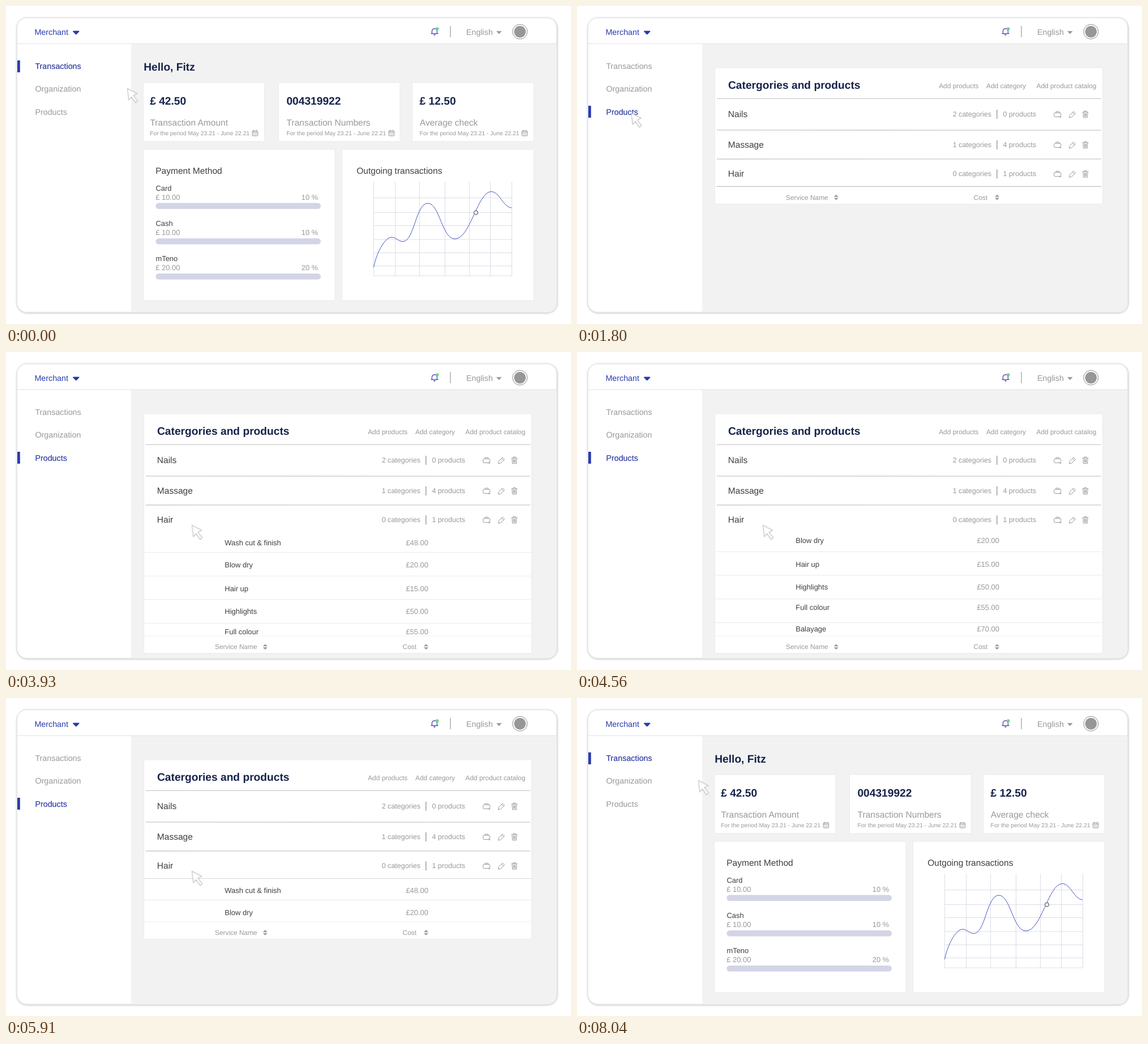
Animation, 998 px wide and 561 px high, one loop 9030 ms. Source, as an HTML page:

```html
<!DOCTYPE html>
<html lang="en">
<head>
<meta charset="utf-8">
<title>Merchant dashboard</title>
<style>
@property --drop { syntax: '<length>'; inherits: true; initial-value: 0px; }

html, body { margin: 0; width: 100%; height: 100%; overflow: hidden; background: #fff; }
svg { display: block; width: 100%; height: 100%; --loop: 9.03s; }
text { font-family: "Liberation Sans", Arial, sans-serif; text-rendering: geometricPrecision; fill: #999; }

.nav { font-size: 14.3px; }
.big { font-size: 19.2px; font-weight: bold; fill: #16234a; }
.mid { font-size: 15.55px; }
.item { font-size: 12.95px; }
.count { font-size: 12.55px; }
.link { font-size: 11.9px; }
.tiny { font-size: 10.35px; }
.dark { fill: #3f3f3f; }
.blue { fill: #2a3bb0; }
.end { text-anchor: end; }
.card { fill: #fff; stroke: #ebebeb; }
.bar { fill: #d3d4e5; }
.rule { stroke: #cacaca; stroke-width: 1.3; }
.thin { stroke: #ebebeb; }
.icon { fill: none; stroke: #999; stroke-width: 1; stroke-linejoin: round; stroke-linecap: round; }

/* One loop = 9030 ms */
#stage { animation: drop var(--loop) infinite; }
#table { height: calc(240px + var(--drop)); }
#window { height: var(--drop); }
#footer { transform: translateY(var(--drop)); }
#cursor { animation: point var(--loop) infinite; }
#dash { animation: dash var(--loop) linear infinite; }
#labels { animation: labels var(--loop) linear infinite; }
#list { animation: list var(--loop) step-end infinite; }
#rows { animation: scroll var(--loop) infinite; }
#onProducts { animation: products var(--loop) step-end infinite; }
#onTransactions { animation: transactions var(--loop) step-end infinite; }

@keyframes point {
  0%, 4.319% { transform: translate(214.5px, 145.5px); animation-timing-function: ease-in-out; }
  11.628%, 19.269% { transform: translate(93.5px, 187.5px); animation-timing-function: ease-in-out; }
  28.571%, 70.764% { transform: translate(328.5px, 305.5px); animation-timing-function: ease-in-out; }
  78.405%, 82.724% { transform: translate(118.5px, 108.5px); animation-timing-function: ease-in-out; }
  89.037%, 100% { transform: translate(214.5px, 145.5px); }
}
@keyframes drop {
  0%, 31.561% { --drop: 0px; animation-timing-function: ease-in-out; }
  35.216%, 63.455% { --drop: 182.5px; animation-timing-function: ease-in-out; }
  67.11%, 100% { --drop: 0px; }
}
@keyframes scroll {
  0%, 42.193% { transform: none; animation-timing-function: ease-in-out; }
  49.668% { transform: translateY(-47px); animation-timing-function: ease-in-out; }
  57.143%, 100% { transform: none; }
}
@keyframes dash {
  0% { opacity: 1; animation-timing-function: step-end; }
  14.28%, 79.734% { opacity: 0; }
  81.063%, 100% { opacity: 1; }
}
@keyframes labels {
  0%, 14.95% { opacity: 0; }
  19.269%, 100% { opacity: 1; }
}
@keyframes list {
  0% { visibility: hidden; }
  31.555%, 100% { visibility: visible; }
}
@keyframes products {
  0% { visibility: hidden; }
  12.62% { visibility: visible; }
  79.4%, 100% { visibility: hidden; }
}
@keyframes transactions {
  0% { visibility: visible; }
  12.62% { visibility: hidden; }
  79.4%, 100% { visibility: visible; }
}
</style>
</head>
<body>
<svg id="stage" viewBox="0 0 998 561">
  <defs>
    <clipPath id="reveal"><rect id="window" x="243" y="318" width="686"/></clipPath>
    <filter id="soft" x="-5%" y="-5%" width="110%" height="110%"><feGaussianBlur stdDeviation="1.3"/></filter>
    <g id="calendar" class="icon">
      <rect x=".5" y="2" width="9.6" height="8.8" rx="1"/>
      <path d="M.5 4.4h9.6M3 .6v2.2M7.6 .6v2.2"/>
      <path d="M2.2 6.6h6.4M2.2 8.8h6.4" stroke-width="1.4" stroke-dasharray="1.2 1.3" stroke-linecap="butt"/>
    </g>
    <g id="sort" fill="#999"><path d="M-4 -.9L0 -4.9L4 -.9ZM-4 .9L0 4.9L4 .9Z"/></g>
    <g id="tools" class="icon">
      <path d="M852 4.5H844.5Q842.8 4.5 842.8 3V-1.2Q842.8 -2.6 844.5 -2.6H853Q854.8 -2.6 854.8 -1.2V2M846 -2.8V-4.8H851.6V-2.8M853.6 2.8V6M852 4.4H855.2"/>
      <path d="M869.6 5.6L870.6 1.4L877 -5L880.6 -1.6L874 4.8ZM875.2 -3.2L878.8 .2"/>
      <path d="M893 -3.8H903M896 -4V-5.8H900V-4M894 -3.6L894.5 5.8H901.5L902 -3.6M896.4 -1.5V3.8M898 -1.5V3.8M899.6 -1.5V3.8"/>
      <path d="M741.8 -8V8" stroke="#888" stroke-width="1.2" stroke-linecap="butt"/>
    </g>
  </defs>

  <!-- Shell -->
  <rect x="19.5" y="21.5" width="954" height="520" rx="18" fill="none" stroke="#d9d9d9" stroke-width="3" filter="url(#soft)"/>
  <rect x="19.5" y="21" width="953" height="519" rx="17" fill="#fff" stroke="#e6e6e6"/>
  <path d="M221 67H972.5V523Q972.5 539.7 956 539.7H221Z" fill="#f2f2f2"/>
  <path d="M20 66.5H973" stroke="#e2e2e2"/>

  <g class="nav">
    <text class="blue" x="50.4" y="51.3">Merchant</text>
    <path class="blue" d="M119 43.7H128.6Q130.2 43.9 129.2 45.2L125 49.8Q123.8 50.9 122.6 49.8L118.4 45.2Q117.6 43.9 119 43.7Z"/>
    <text x="813" y="51.3">English</text>
    <path d="M866 44.3H875.6L870.8 49.4Z" fill="#999"/>
    <text x="51.4" y="110.6">Transactions</text>
    <text x="51.4" y="150.6">Organization</text>
    <text x="51.4" y="191.6">Products</text>
    <g id="onTransactions">
      <rect x="20" y="96" width="4.8" height="21" class="blue"/>
      <text class="blue" x="51.4" y="110.6">Transactions</text>
    </g>
    <g id="onProducts">
      <rect x="20" y="176" width="4.8" height="21" class="blue"/>
      <text class="blue" x="51.4" y="191.6">Products</text>
    </g>
  </g>

  <path d="M751 48.6H763M752.4 48.4V44.6Q752.6 40 757 39.8Q761.4 40 761.4 44.6V48.4" fill="none" stroke="#4d35b5" stroke-width="1.2" stroke-linecap="round"/>
  <path d="M754.8 50.2H759Q758.4 52 756.9 52T754.8 50.2Z" fill="#4d35b5"/>
  <circle cx="761.6" cy="40.4" r="2.9" fill="#6bd688"/>
  <path d="M785 35V55" stroke="#999" stroke-width="1.2"/>
  <circle cx="907.8" cy="45.3" r="13" fill="#fff" stroke="#8c8c8c"/>
  <circle cx="907.8" cy="45.3" r="10.4" fill="#979797"/>

  <!-- Products page -->
  <rect id="table" class="card" x="243.5" y="109" width="685" rx="1"/>
  <g class="rule">
    <path d="M247 163.4H926M247 218.9L926 219.1M247 270L926 269.8M247 318.3H926"/>
  </g>
  <g id="labels">
    <text class="big" x="267" y="146.1">Catergories and products</text>
    <g class="link">
      <text x="639.2" y="144.6">Add products</text>
      <text x="723" y="144.6">Add category</text>
      <text x="811.5" y="144.6">Add product catalog</text>
    </g>
    <g class="mid">
      <text class="dark" x="266.8" y="195.6">Nails</text>
      <text class="dark" x="266.8" y="249.6">Massage</text>
      <text class="dark" x="266.8" y="300.8">Hair</text>
    </g>
    <g class="count">
      <text class="end" x="732" y="194.9">2 categories</text>
      <text class="end" x="732" y="248.9">1 categories</text>
      <text class="end" x="732" y="300.1">0 categories</text>
      <text class="end" x="811" y="194.9">0 products</text>
      <text class="end" x="811" y="248.9">4 products</text>
      <text class="end" x="811" y="300.1">1 products</text>
    </g>
    <use href="#tools" y="191"/>
    <use href="#tools" y="245"/>
    <use href="#tools" y="296.2"/>
  </g>

  <g id="list">
    <rect x="244" y="317" width="684" height="3" fill="#fff"/>
    <g clip-path="url(#reveal)">
      <rect x="244" y="318" width="684" height="190" fill="#fff"/>
      <g id="rows" class="item">
        <path class="thin" d="M244 356.5H928M244 398.2H928M244 439.6H928M244 481.4H928"/>
        <path class="thin" d="M244 523.2H928"/>
        <path d="M244 318.5H928" stroke="#d6d6d6"/>
        <text class="dark" x="386.3" y="343.6">Wash cut &amp; finish</text>
        <text class="dark" x="386.3" y="382.8">Blow dry</text>
        <text class="dark" x="386.3" y="424.7">Hair up</text>
        <text class="dark" x="386.3" y="465.1">Highlights</text>
        <text class="dark" x="386.3" y="501">Full colour</text>
        <text class="dark" x="386.3" y="538.8">Balayage</text>
        <text x="706.4" y="343.6">£48.00</text>
        <text x="706.4" y="382.8">£20.00</text>
        <text x="706.4" y="424.7">£15.00</text>
        <text x="706.4" y="465.1">£50.00</text>
        <text x="706.4" y="501">£55.00</text>
        <text x="706.4" y="538.8">£70.00</text>
      </g>
    </g>
  </g>

  <g id="footer" class="link">
    <rect x="244" y="319" width="684" height="29.5" fill="#fff"/>
    <path d="M244 318.6H928" stroke="#000" stroke-opacity=".06"/>
    <text x="369" y="341.8">Service Name</text>
    <text x="700.6" y="341.8">Cost</text>
    <use href="#sort" x="457.8" y="337.7"/>
    <use href="#sort" x="742" y="337.7"/>
  </g>

  <!-- Transactions page -->
  <g id="dash">
    <rect x="222" y="68" width="748" height="452" fill="#f2f2f2"/>
    <text class="big" x="243.2" y="113.8">Hello, Fitz</text>
    <g class="card">
      <rect x="242.5" y="135" width="214" height="104"/>
      <rect x="481.5" y="135" width="214.5" height="104"/>
      <rect x="717.5" y="135" width="214.5" height="104"/>
      <rect x="242.5" y="253" width="338.5" height="266.5"/>
      <rect x="593.5" y="253" width="338.5" height="266.5"/>
    </g>
    <text class="big" x="254.2" y="174">£ 42.50</text>
    <text class="big" x="495.4" y="174">004319922</text>
    <text class="big" x="730.6" y="174">£ 12.50</text>
    <g class="mid">
      <text x="254.4" y="210.7">Transaction Amount</text>
      <text x="495.6" y="210.7">Transaction Numbers</text>
      <text x="730.8" y="210.7">Average check</text>
    </g>
    <g class="tiny">
      <text x="254.2" y="227.8">For the period May 23.21 - June 22.21</text>
      <text x="495.4" y="227.8">For the period May 23.21 - June 22.21</text>
      <text x="730.6" y="227.8">For the period May 23.21 - June 22.21</text>
    </g>
    <use href="#calendar" x="434.6" y="218.3"/>
    <use href="#calendar" x="675.6" y="218.3"/>
    <use href="#calendar" x="910.8" y="218.3"/>

    <text class="mid dark" x="264.2" y="295.7">Payment Method</text>
    <g class="item">
      <text class="dark" x="264.4" y="326">Card</text>
      <text x="264.2" y="342">£ 10.00</text>
      <text class="end" x="551.2" y="342">10 %</text>
      <text class="dark" x="264.4" y="388.4">Cash</text>
      <text x="264.2" y="404.4">£ 10.00</text>
      <text class="end" x="551.2" y="404.4">10 %</text>
      <text class="dark" x="264.4" y="450.4">mTeno</text>
      <text x="264.2" y="466.2">£ 20.00</text>
      <text class="end" x="551.2" y="466.2">20 %</text>
    </g>
    <g class="bar">
      <rect x="264.4" y="347.5" width="291.6" height="10.6" rx="5.3"/>
      <rect x="264.4" y="409.9" width="291.6" height="10.6" rx="5.3"/>
      <rect x="264.4" y="471.9" width="291.6" height="10.6" rx="5.3"/>
    </g>

    <text class="mid dark" x="619.2" y="295.7">Outgoing transactions</text>
    <path d="M649.5 310V476M687.5 310V476M730.5 310V476M775.5 310V476M818.5 310V476M855.5 310V476M893.5 310V476M649 338.5H893.5M649 364.5H893.5M649 387.5H893.5M649 412H893.5M649 435.5H893.5M649 458.5H893.5M649 476H893.5" fill="none" stroke="#dcdde8"/>
    <path d="M649.5 461C653 440 668 408 681 408C689 408 693 415.5 701 415.5C721 415.5 724 348 745 348C766 348 770 411 793 411C820 411 833 327.5 857 327.5C872 327.5 878 355 893 356" fill="none" stroke="#4455c0"/>
    <circle cx="830" cy="364.5" r="3.4" fill="#fff" stroke="#8a8a8a" stroke-width="1.8"/>
  </g>

  <path id="cursor" d="M0 0L17.2 9L10.5 12.5L18.2 22.4L14.4 25.2L7 15.2L2.4 20.5Z" fill="#fff" stroke="#b9b9b9" stroke-width="1.1" stroke-linejoin="round"/>
</svg>
</body>
</html>
```
